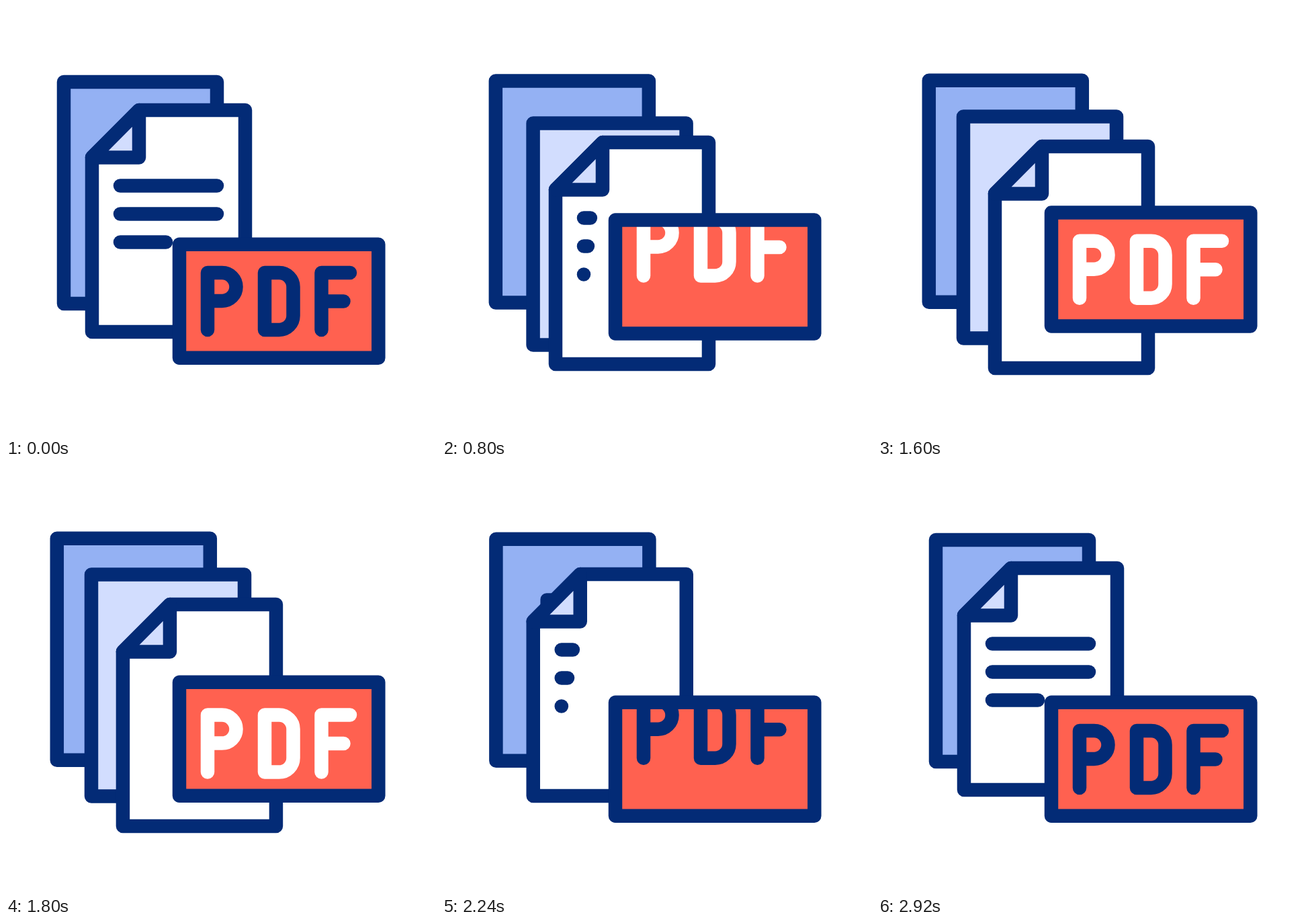
An HTML page that plays this animation: 640 by 640 pixels, repeating every 3000 ms.

```html
<!DOCTYPE html>
<html>
<head>
<meta charset="utf-8">
<style>
  html, body { margin: 0; height: 100%; overflow: hidden; background: #fff; }
  svg { display: block; width: 100%; height: 100%; }
</style>
</head>
<body>
<svg viewBox="0 0 640 640" fill="none" stroke="#032b76" stroke-width="20.5" stroke-linecap="round" stroke-linejoin="round">
  <defs>
    <path id="letters" d="M300 482V397H321.5a21 21 0 0 1 0 42H300M385 397H406.5a21 21 0 0 1 21 21V461a21 21 0 0 1-21 21H385ZM469.5 482V397H512M469.5 439.5H502.5"/>
    <clipPath id="window"><rect x="258" y="354.7" width="296.3" height="169"/></clipPath>
  </defs>
  <rect id="back" x="86" y="113" width="228" height="330" fill="#94b1f3"/>
  <rect id="middle" x="-114" y="-165" width="228" height="330" fill="#d2ddfe"/>
  <g id="front">
    <path d="M198 155H356V485H128V225Z" fill="#fff"/>
    <path d="M198 155V225.5H128Z" fill="#d2ddfe"/>
    <g id="lines"><path/><path/><path/></g>
  </g>
  <g id="label">
    <rect x="258" y="354.7" width="296.3" height="169" fill="#ff6150" stroke="none"/>
    <g clip-path="url(#window)">
      <use id="dark" href="#letters"/>
      <use id="light" href="#letters" stroke="#fff"/>
    </g>
    <rect x="258" y="354.7" width="296.3" height="169"/>
  </g>
</svg>
<script>
const LOOP = 3000, TRAVEL = 300;
const $ = id => document.getElementById(id);
const lines = [...$('lines').children];
// Full length, then start and duration of shrinking and growing
const lineSpecs = [
  [144, 274, 670, 2064, 670],
  [144, 179, 755, 2084, 755],
  [68, 160, 640, 2200, 640],
];

function ease(t, start, duration) {
  const u = Math.min(1, Math.max(0, (t - start) / duration));
  return u * u * u * (10 + u * (6 * u - 15));
}

const outAndBack = (t, out, outTime, back, backTime) =>
  ease(t, out, outTime) - ease(t, back, backTime);

function move(id, x, y, scale = 1) {
  $(id).setAttribute('transform', `translate(${x} ${y}) scale(${scale})`);
}

function draw(t) {
  const back = outAndBack(t, 418, 690, 1914, 690);
  move('back', -10.2 * back, -2.3 * back);

  const tucked = 1 - outAndBack(t, 433, 690, 1774, 690);
  const grown = outAndBack(t, 400, 400, 2005, 500);
  move('middle', 241 + 19.6 * tucked, 329.5 + 23 * tucked, 0.75 + 0.25 * grown);

  const front = outAndBack(t, 290, 686, 1769, 678);
  move('front', 46 * front, 54 * front);

  $('lines').style.display = t > 920 && t < 2120 ? 'none' : '';
  lineSpecs.forEach(([length, ...times], i) => {
    const width = length * (1 - outAndBack(t, ...times));
    lines[i].setAttribute('d', `M170 ${267.5 + 42 * i}h${Math.max(0.01, width)}`);
  });

  move('label', 0, -48 * outAndBack(t, 390, 639, 1523, 640));

  // Each change of colour drops one word out and the other one in
  const opening = t < 1300;
  const drop = TRAVEL * (opening ? ease(t, 418, 538) : ease(t, 1695, 767));
  move(opening ? 'dark' : 'light', 0, drop);
  move(opening ? 'light' : 'dark', 0, drop - TRAVEL);
}

function tick() {
  draw(performance.now() % LOOP);
  requestAnimationFrame(tick);
}
tick();
</script>
</body>
</html>
```
